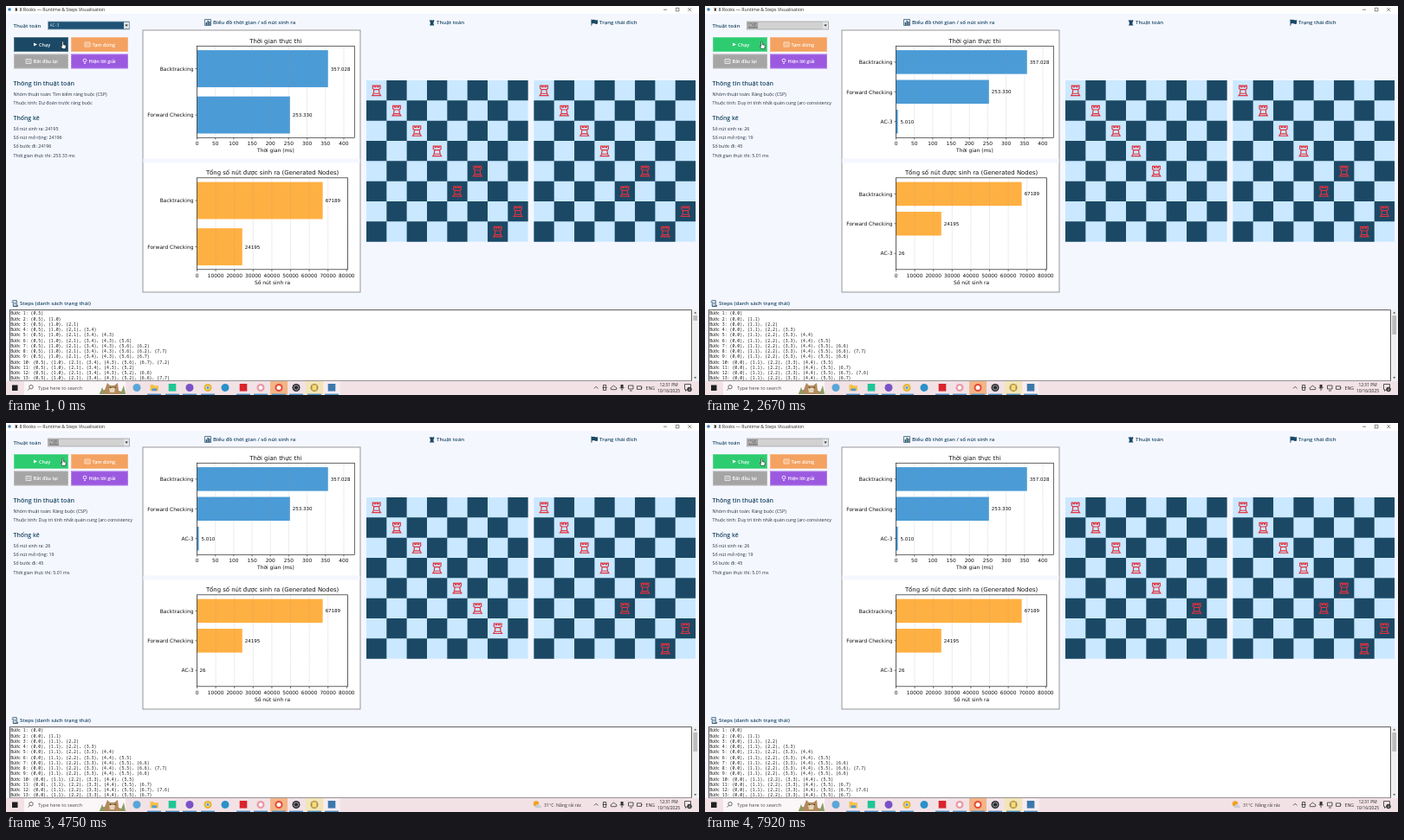
Animation of 800x450 px, one loop 8 s. Source, as an HTML page:

```html
<!DOCTYPE html>
<html lang="vi">
<head>
<meta charset="utf-8">
<title>8 Rooks</title>
<style>
html, body { margin: 0; width: 100%; height: 100%; overflow: hidden; background: #f5f7ff; }
svg { display: block; width: 100vw; height: 100vh; }
text { white-space: pre; }
.ui { font-family: "Open Sans", "Noto Sans", sans-serif; }
.plot { font-family: "DejaVu Sans", sans-serif; }
.mono { font-family: "Noto Sans Mono", "DejaVu Sans Mono", monospace; }
</style>
</head>
<body>
<svg id="stage" viewBox="0 0 800 450"></svg>
<script>
const LOOP = 8000, RELEASE = 80, RESULT = 310, STEP = 500;
const NAVY = '#1b4965', SKY = '#cae8ff', RED = '#e0313f', CELL = 23.33;

// Each string is one step: the column of the rook in every filled row.
const oldSteps = ['5', '50', '501', '5014', '50143', '501436', '5014362', '50143627',
  '5014367', '50143672', '501432', '5014326', '50143267'];
const newSteps = ['0', '01', '012', '0123', '01234', '012345', '0123456', '01234567',
  '0123456', '012345', '0123457', '01234576', '0123457', '012345', '01234', '012346'];
const solution = '01235476';

const rect = (x, y, w, h, fill, extra = '') =>
  `<rect x="${x}" y="${y}" width="${w}" height="${h}" fill="${fill}" ${extra}/>`;
const circle = (x, y, r, fill, extra = '') =>
  `<circle cx="${x}" cy="${y}" r="${r}" fill="${fill}" ${extra}/>`;
const path = (d, fill, extra = '') => `<path d="${d}" fill="${fill}" ${extra}/>`;
const line = (d, color, width = .7, extra = '') =>
  path(d, 'none', `stroke="${color}" stroke-width="${width}" ${extra}`);
const text = (x, y, s, size, fill = '#26323c', extra = '', font = 'ui') =>
  `<text class="${font}" x="${x}" y="${y}" font-size="${size}" fill="${fill}" ${extra}>${s}</text>`;
const group = (id, body, extra = '') => `<g id="${id}" ${extra}>${body}</g>`;
const bold = 'font-weight="600"';
const middle = 'text-anchor="middle"';
const heading = (x, y, s, size = 6.1) => text(x, y, s, size, NAVY, bold);

function titleBar() {
  return rect(0, 0, 800, 9, '#fff') + circle(4, 4, 1.8, '#3f7fc4') +
    text(9.5, 6.3, '♜ 8 Rooks — Runtime &amp; Steps Visualisation', 5.2, '#222') +
    line('M759 4.2h4M773.3 2.3h3.6v3.6h-3.6zM787.3 2.3l3.8 3.8m0-3.8l-3.8 3.8', '#333', .6);
}

function button(x, y, w, fill) {
  return rect(x, y, w, 17, fill) +
    rect(x + .5, y + .5, w - 1, 16, 'none', 'stroke="#fff" stroke-opacity=".75" stroke-width=".6" stroke-dasharray="1 1"');
}
const caption = (x, y, s) => text(x, y, s, 5.5, '#fff', bold);

function controls() {
  const icon = (x, y) => line(`M${x} ${y}h6v5h-6zM${x + 2} ${y + 1.3}v2.4m2-2.4v2.4`, '#fff', .7);
  return heading(8.5, 25, 'Thuật toán', 6) +
    group('comboBefore',
      rect(48.5, 18, 94, 9, '#1d5275', 'stroke="#8fa9b8" stroke-width=".8"') +
      text(50.5, 24.4, 'AC-3', 5.1, '#cfe0ec')) +
    group('comboAfter',
      rect(48.5, 18, 94, 9, '#d2d2d2', 'stroke="#999" stroke-width=".7"') +
      rect(49.5, 19, 11.5, 7, '#8b8b8b') + text(50, 24.4, 'AC-3', 5.1, '#ddd')) +
    rect(136, 18.7, 6, 7.6, '#e1e4e8') + path('M137.4 21.5h3.4l-1.7 2.2z', '#333') +
    group('pressed', button(9, 36, 63, NAVY)) + group('released', button(9, 36, 63, '#2ecc71')) +
    button(75, 36, 66, '#f4a261') + button(9, 55.5, 63, '#a5a5a5') + button(75, 55.5, 66, '#9b59e0') +
    path('M32 42.5l4 2-4 2z', '#fff') + caption(38, 46.5, 'Chạy') +
    icon(91, 42) + caption(99.5, 46.5, 'Tạm dừng') +
    icon(23, 61.5) + caption(31.5, 66, 'Bắt đầu lại') +
    circle(91, 63, 1.9, 'none', 'stroke="#fff" stroke-width=".8"') + line('M90 66.4h2', '#fff', .9) +
    caption(95.5, 66, 'Hiện lời giải');
}

function info(kind, trait, stats) {
  const labels = ['Số nút sinh ra: ', 'Số nút mở rộng: ', 'Số bước đi: ', 'Thời gian thực thi: '];
  return text(8.5, 103.6, 'Nhóm thuật toán: ' + kind, 5.3) +
    text(8.5, 114.2, 'Thuộc tính: ' + trait, 5.3) +
    labels.map((s, i) => text(8.5, 143.6 + i * 10.4, s + stats[i], 5.3)).join('');
}

function chart({ top, right, title, label, scale, step, ticks, color, digits }, values) {
  const left = 220.5, height = 106, mid = (left + right) / 2;
  const names = ['Backtracking', 'Forward Checking', 'AC-3'];
  const unit = height / ((values.length - .2) * 1.1);
  let out = text(mid, top - 3.6, title, 6.9, '#111', middle, 'plot');
  const bars = values.map((v, i) => {
    const y = top + unit * (.4 + (values.length - .2) * .05 + i);
    out += rect(left, y - unit * .4, v * scale, unit * .8, color);
    return text(left + v * scale + 3, y + 2, v.toFixed(digits), 5.5, '#111', '', 'plot') +
      text(216.5, y + 2.2, names[i], 5.95, '#111', 'text-anchor="end"', 'plot') +
      line(`M218.3 ${y}h2.2`, '#222', .6);
  }).join('');
  for (let i = 0; i <= ticks; i++) {
    const x = left + i * step * scale;
    out += line(`M${x} ${top}v${height}`, '#999', .5, 'stroke-dasharray="1.6 .8" opacity=".55"') +
      line(`M${x} ${top + height}v2.2`, '#222', .6) +
      text(x, top + height + 9, i * step, 5.85, '#111', middle, 'plot');
  }
  return out + bars + rect(left, top, right - left, height, 'none', 'stroke="#222" stroke-width=".7"') +
    text(mid, top + height + 17, label, 5.95, '#111', middle, 'plot');
}

const timeChart = { top: 46.3, right: 402.3, title: 'Thời gian thực thi', label: 'Thời gian (ms)',
  scale: .4236, step: 50, ticks: 8, color: '#4a9bd6', digits: 3 };
const nodeChart = { top: 198.8, right: 394.6, title: 'Tổng số nút được sinh ra (Generated Nodes)',
  label: 'Số nút sinh ra', scale: .00216, step: 10000, ticks: 8, color: '#ffb042', digits: 0 };
const charts = (times, nodes) => chart(timeChart, times) + chart(nodeChart, nodes);

function chartFrame() {
  return rect(158, 28, 251, 303, '#fff', 'stroke="#8d8d8d" stroke-width=".9"') +
    rect(158.5, 176.5, 250, 5, '#f5f7ff');
}

function rook(x, y, id = '') {
  return `<g ${id && `id="${id}"`} transform="translate(${x} ${y})">` +
    line('M-4.4-5.6h2v1.7h1.4v-1.7h2v1.7h1.4v-1.7h2v3.4l-1.5 1.2.5 4.6h-6.8l.5-4.6-1.5-1.2zM-3.2-1h6.4M-3.4 3.6l-1.5 2.3h9.8l-1.5-2.3', RED, 1.15) + '</g>';
}
const cellX = (left, col) => left + (+col + .5) * CELL;
const cellY = row => 86 + (row + .5) * CELL;

function board(left, idPrefix) {
  let dark = '';
  for (let i = 0; i < 64; i++) {
    const r = i >> 3, c = i & 7;
    if ((r + c) % 2) dark += `M${left + c * CELL} ${86 + r * CELL}h${CELL}v${CELL}h-${CELL}z`;
  }
  return rect(left, 86, CELL * 8, CELL * 8, SKY) + path(dark, NAVY) +
    [...solution].map((c, r) => rook(cellX(left, c), cellY(r), idPrefix && idPrefix + r)).join('');
}

function headings() {
  return line('M229.5 15.5h7v7h-7z', NAVY, .7) + path('M230.7 19h1.3v3h-1.3zm1.8-2.3h1.3v5.3h-1.3zm1.8 1.2h1.3v4.1h-1.3z', NAVY) +
    heading(239, 21.4, 'Biểu đồ thời gian / số nút sinh ra') +
    path('M489.2 16h1.1v1h.8v-1h1.2v1h.8v-1h1.1v2.2l-.8.7.3 2.3.8 1.4h-5.6l.8-1.4.3-2.3-.8-.7z', NAVY) +
    heading(497, 21.4, 'Thuật toán') +
    path('M675.5 15.5h.9v.6q2-.9 3.5 0t3.2 0v4.4q-1.7.9-3.2 0t-3.5 0v2.2h-.9z', NAVY) +
    heading(685, 21.4, 'Trạng thái đích') +
    line('M7.3 340.7h5v6.6h-4v-5h-1.7m3 1h1.7m-1.7 1.5h1.7M8.2 347.4h5.4v-1.5', NAVY, .8) +
    heading(16, 346.4, 'Steps (danh sách trạng thái)') +
    heading(8.5, 92.2, 'Thông tin thuật toán', 7.1) + heading(8.5, 131.6, 'Thống kê', 6.9);
}

function stepList(steps, thumb) {
  const rows = steps.slice(0, 13).map((cols, i) => text(5.2, 357.4 + i * 6.24,
    `Bước ${i + 1}: ` + [...cols].map((c, r) => `(${r},${c})`).join(', '), 4.87, '#111', 'font-weight="500"', 'mono'));
  return rows.join('') + rect(793.3, 358, 4.8, thumb, '#bcbcbc');
}

function listFrame() {
  return rect(4.3, 351.7, 787.2, 82, '#fff', 'stroke="#333" stroke-width=".8"') +
    rect(793, 351.5, 5.4, 82, '#efefef') +
    path('M794.2 355.6l1.5-1.8 1.5 1.8z', '#444') + path('M794.2 429.2l1.5 1.8 1.5-1.8z', '#444');
}

function taskbar() {
  const apps = [[151, '#59a6d8'], [192, '#20c596'], [212, '#7a52c7'], [233, '#e5b732'], [253, '#2a91c9'],
    [274, '#d9242b'], [294, '#e99aa8'], [315, '#e64a35'], [335, '#292a30'], [356, '#a98d45'], [376, '#3d78ad']];
  const squares = [192, 274, 376];
  const icons = apps.map(([x, c]) => squares.includes(x) ? rect(x - 4.3, 437, 8.6, 8.6, c) : circle(x, 441.5, 4.5, c)).join('');
  const underlines = [171, 192, 212, 233, 274, 294, 315, 335, 356, 376]
    .map(x => rect(x - 8, 448.6, 16, 1.4, '#4d8fc4')).join('');
  const cat = path('M108 449q1-5 6-5l3-8 3 3h5l4-3 1 9q5 1 6 4z', '#b28a5e') +
    path('M119 442h7l-1 5h-5z', '#e6d5ba') + circle(120.5, 441.5, .8, '#433626') + circle(126, 441.5, .8, '#433626') +
    path('M108 449l3-8 3 8zM132 449l4-10 2 10z', '#8a9b62');
  const tray = line('M679 442.5l2.2-2.2 2.2 2.2M689.5 438.5h3.2v6h-3.2zM688.6 441.5h5', '#333', .8) +
    line('M698.5 443.7q-1.5-2 1-3 2-3 4 0 2.5.8 1 3z', '#333', .8) +
    path('M709.6 438h3v4h-3z', '#333') + line('M708.6 441q2.5 4 5 0m-2.5 2v2.2', '#333', .7) +
    line('M718.5 439h5.5v4h-5.5zM720 445h3M728.5 439.8h5v3.6h-5zM734 441v1.3', '#333', .8);
  return rect(0, 433.7, 800, 16.3, '#f2e2e6') +
    rect(7, 438.5, 6.5, 6.5, '#202020') +
    rect(21, 434.2, 117, 15.8, '#fbf6f7') +
    circle(29, 440.7, 2.2, 'none', 'stroke="#333" stroke-width=".7"') + line('M27.4 442.4l-2 2.1', '#333') +
    text(37, 443.8, 'Type here to search', 5.6, '#4a4a4a') + cat +
    rect(305, 434, 20, 16, '#f3b486') + rect(346, 434, 20, 16, '#f3e5b6') + rect(366.5, 434, 19, 16, '#f8edf0') +
    underlines + icons +
    path('M166.5 438h3.5l1 1.2h5v6h-9.5z', '#f3c04a') + rect(168.5, 442.5, 5.5, 2.7, '#4b9bd8') +
    circle(233, 441.5, 1.8, '#4285d6', 'stroke="#fff" stroke-width=".7"') +
    circle(294, 441.5, 2.2, '#fff') + circle(315, 441.5, 2.5, '#fff') +
    circle(335, 441.5, 2.7, 'none', 'stroke="#bbb" stroke-width=".8"') +
    rect(353.5, 438.5, 5, 6, '#f7dc7a') + tray +
    text(738.5, 443.6, 'ENG', 5.2, '#222') +
    text(765, 439.6, '12:31 PM', 4.9, '#222', middle) + text(765, 447.4, '10/16/2025', 4.9, '#222', middle) +
    path('M783.5 437.5h7v6h-4l-2 2v-2h-1z', 'none', 'stroke="#333" stroke-width=".8"') +
    circle(789, 443.5, 2.7, '#333') + text(789, 445, '4', 4, '#fff', middle) +
    group('weather', circle(612, 440.5, 3.2, '#f4a01f') + path('M611 445.2q-1.5-2.5 1-3 2-2.8 4 0 3 .5 1.4 3z', '#c9ced6') +
      text(621, 443.6, '31°C  Nắng rải rác', 5.2, '#333'));
}

const cursor = path('M64.7 41.5q1-1 1.6.2v3l2.2.5q1 .3.8 1.4l-.7 3h-3.3l-2-2.8q-.2-1.2 1.4-.2z', '#fff', 'stroke="#111" stroke-width=".6"');

document.getElementById('stage').innerHTML = rect(0, 0, 800, 450, '#f5f7ff') +
  titleBar() + chartFrame() + listFrame() + headings() + controls() +
  group('before', info('Tìm kiếm ràng buộc (CSP)', 'Dự đoán trước ràng buộc', ['24195', '24196', '24196', '253.33 ms']) +
    charts([357.028, 253.33], [67189, 24195]) + stepList(oldSteps, 6)) +
  group('after', info('Ràng buộc (CSP)', 'Duy trì tính nhất quán cung (arc-consistency', ['26', '19', '45', '5.01 ms']) +
    charts([357.028, 253.33, 5.01], [67189, 24195, 26]) + stepList(newSteps, 22)) +
  board(416, 'rook') + board(609.4, '') + taskbar() + cursor;

const byId = id => document.getElementById(id);
const show = (id, on) => { byId(id).style.display = on ? '' : 'none'; };

function update(t) {
  const released = t >= RELEASE, done = t >= RESULT;
  show('pressed', !released);
  show('released', released);
  show('comboBefore', !released);
  show('comboAfter', released);
  show('before', !done);
  show('after', done);

  const index = Math.min(newSteps.length - 1, Math.floor((t - RESULT) / STEP));
  const cols = done ? newSteps[index] : solution;
  for (let r = 0; r < 8; r++) {
    show('rook' + r, r < cols.length);
    if (r < cols.length) byId('rook' + r).setAttribute('transform', `translate(${cellX(416, cols[r])} ${cellY(r)})`);
  }
  byId('weather').setAttribute('opacity', Math.max(0, Math.min(1, (t - 3330) / 500)));
}

const start = performance.now();
function tick() {
  update((performance.now() - start) % LOOP);
  requestAnimationFrame(tick);
}
tick();
</script>
</body>
</html>
```
